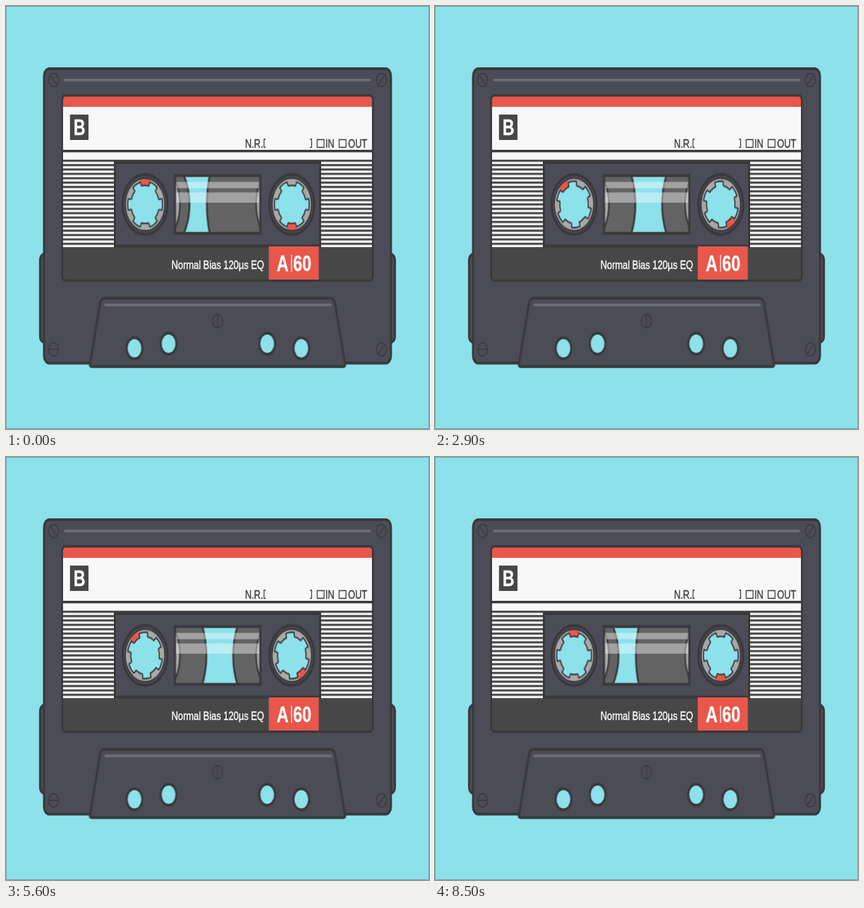
An HTML page without scripts for the animation above (9000 ms loop, 600x600 px).

```html
<!DOCTYPE html>
<html lang="en">
<head>
<meta charset="utf-8">
<title>Cassette</title>
<style>
  html, body { margin: 0; height: 100%; overflow: hidden; background: #8ce1ea; }
  svg { display: block; width: 100%; height: 100%; }
  text { font-family: "Liberation Sans", Arial, sans-serif; font-size: 17.2px; fill: #3d3d3f; stroke: #3d3d3f; stroke-width: .4; }
  .big { font-size: 31px; font-weight: bold; }
  .light { fill: #fff; stroke: #fff; }
  .shell { fill: #4c4c57; }
  .line { stroke: #39393b; stroke-width: 4; }
  .thin { fill: none; stroke: #39393b; stroke-width: 1.6; }
  .shine { fill: none; stroke: #6c6c78; stroke-width: 4; stroke-linecap: round; }
  .sky { fill: #8ce1ea; }
  .dark { fill: #474747; }
  .red { fill: #e9574b; }
  .tape { fill: #636363; stroke-width: 3.5; }
  .hub { fill: #a8a8a9; stroke-width: 3; }

  /* play 4 s, rest, rewind 4 s, rest; 20 poses a second */
  .spin, .feed, .take { animation: spin 9s -5ms infinite; }
  .feed { animation-name: feed; }
  .take { animation-name: take; }
  @keyframes spin {
    0% { transform: rotate(0deg); animation-timing-function: steps(80); }
    44.4444%, 50% { transform: rotate(1440deg); animation-timing-function: steps(80); }
    94.4444%, 100% { transform: rotate(0deg); }
  }
  @keyframes take {
    0% { rx: 84px; ry: 84px; animation-timing-function: steps(80); }
    44.4444%, 50% { rx: 128px; ry: 128px; animation-timing-function: steps(80); }
    94.4444%, 100% { rx: 84px; ry: 84px; }
  }
  @keyframes feed {
    0% { rx: 160px; ry: 160px; animation-timing-function: steps(80); }
    44.4444%, 50% { rx: 91.5px; ry: 91.5px; animation-timing-function: steps(80); }
    94.4444%, 100% { rx: 160px; ry: 160px; }
  }
</style>
</head>
<body>
<svg viewBox="0 0 800 600" preserveAspectRatio="none">
  <defs>
    <pattern id="stripes" y="218" width="20" height="6.2" patternUnits="userSpaceOnUse">
      <rect width="20" height="6.2" fill="#f8f8f8"/>
      <rect class="dark" width="20" height="3"/>
    </pattern>
    <clipPath id="label"><rect x="106" y="127" width="588" height="262" rx="6"/></clipPath>
    <clipPath id="window"><rect x="320" y="240" width="161" height="82"/></clipPath>
    <g id="screw" class="thin"><circle r="9.5"/><path d="M0-9.5V9.5"/></g>
    <path id="tooth" class="sky" stroke="#39393b" stroke-width="2.2" stroke-linejoin="round"
      d="M-6.8-26.1A27 27 0 0 1 6.8-26.1L9.1-31.7A33 33 0 0 1 22.9-23.7L19.3-18.9"/>
    <g id="gear">
      <circle r="37.5" fill="#a8a8a9"/>
      <path class="red" d="M0 0L-10-36.1A37.5 37.5 0 0 1 10-36.1Z"/>
      <circle class="sky" r="27"/>
      <use href="#tooth"/>
      <use href="#tooth" transform="rotate(60)"/>
      <use href="#tooth" transform="rotate(120)"/>
      <use href="#tooth" transform="rotate(180)"/>
      <use href="#tooth" transform="rotate(240)"/>
      <use href="#tooth" transform="rotate(300)"/>
      <circle class="line" r="37.5" fill="none" style="stroke-width:2.4"/>
    </g>
  </defs>

  <rect class="sky" width="800" height="600"/>
  <rect x=".5" y=".5" width="799" height="599" fill="none" stroke="#6fa3aa"/>

  <!-- shell -->
  <rect class="shell line" x="64.5" y="352" width="671" height="125" rx="8"/>
  <rect class="shell line" x="72" y="89" width="656" height="417.5" rx="10"/>
  <path class="shine" d="M112 105H688"/>
  <use href="#screw" transform="translate(90 105) rotate(-42)"/>
  <use href="#screw" transform="translate(710 105) rotate(42)"/>
  <use href="#screw" transform="translate(90 487) rotate(90)"/>
  <use href="#screw" transform="translate(710 487) rotate(42)"/>

  <!-- label -->
  <g clip-path="url(#label)">
    <rect x="106" y="126" width="588" height="264" fill="#f8f8f8"/>
    <rect class="red" x="106" y="126" width="588" height="17"/>
    <rect x="106" y="218" width="588" height="125" fill="url(#stripes)"/>
    <rect class="dark" x="106" y="342.5" width="588" height="48"/>
    <path class="line" d="M106 205.7H694" style="stroke-width:3.4"/>
  </g>
  <rect class="line" x="106.2" y="126.8" width="587.6" height="262.8" rx="6" fill="none" style="stroke-width:3.4"/>
  <rect class="dark" x="121" y="154" width="35" height="36"/>
  <text class="big light" x="127.8" y="183">B</text>
  <text x="452" y="201">N.R.</text>
  <path class="thin" d="M491 189H488V200.5H491M575 189H578V200.5H575M588.5 189.5h13v11h-13zM630 189.5h13v11h-13z"/>
  <text x="604" y="201">IN</text>
  <text x="647" y="201">OUT</text>
  <text class="light" x="313" y="373">Normal Bias 120µs EQ</text>

  <!-- reels -->
  <rect class="shell line" x="206" y="222" width="388" height="118.5"/>
  <rect class="red" x="497" y="341" width="94.5" height="47"/>
  <text class="big light" x="512" y="376">A</text>
  <path d="M540 353V377" stroke="#fff" stroke-width="1.6"/>
  <text class="big light" x="543" y="376">60</text>
  <g transform="translate(263 281.5)">
    <circle class="shell line" r="42.5"/>
    <g class="spin"><use href="#gear"/></g>
  </g>
  <g transform="translate(540.5 281.5) rotate(180)">
    <circle class="shell line" r="42.5"/>
    <g class="spin"><use href="#gear"/></g>
  </g>

  <!-- window -->
  <g clip-path="url(#window)">
    <rect class="sky" x="320" y="240" width="161" height="82"/>
    <ellipse class="tape line take" cx="263" cy="281.5" rx="84" ry="84"/>
    <ellipse class="tape line feed" cx="540" cy="281.5" rx="160" ry="160"/>
    <circle class="hub line" cx="263" cy="281.5" r="66"/>
    <circle class="hub line" cx="540" cy="281.5" r="67"/>
    <path fill="#fff" fill-opacity=".4" d="M320 249.5H481V258.5H320zM320 264.5H481V279H320z"/>
  </g>
  <rect class="line" x="319.5" y="240.5" width="161.5" height="82" fill="none"/>

  <!-- lower plate -->
  <path class="shell line" d="M162 511.5Q158 511.5 159 507.5L178 421Q180 414.5 187 414.5H613Q620 414.5 622 421L641 507.5Q642 511.5 638 511.5Z"/>
  <path class="shine" d="M188 424H614"/>
  <use href="#screw" transform="translate(400 447)"/>
  <g class="sky line">
    <circle cx="243" cy="485.5" r="15"/>
    <circle cx="307.5" cy="479" r="15"/>
    <circle cx="494" cy="479" r="15"/>
    <circle cx="558.5" cy="485.5" r="15"/>
  </g>
</svg>
</body>
</html>
```
